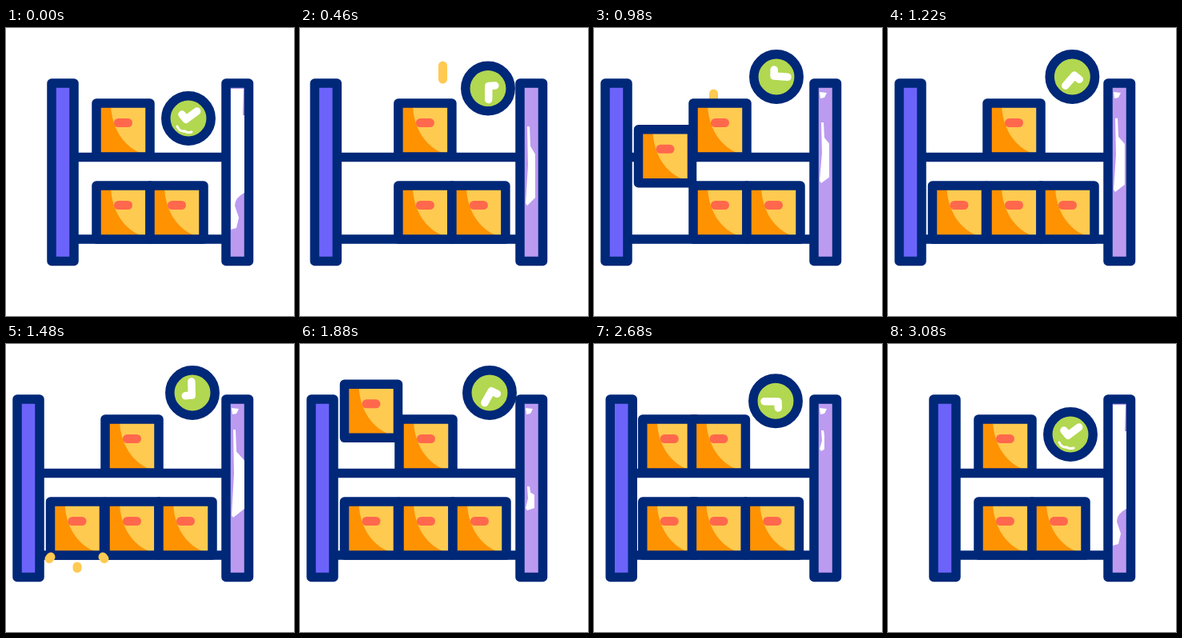
An HTML page for the animation above (3.44 s loop, 360x360 px).

```html
<!DOCTYPE html>
<html lang="en">
<head>
<meta charset="utf-8">
<title>Shelf</title>
<style>
  html, body { margin: 0; width: 100%; height: 100%; overflow: hidden; background: #fff; }
  svg { display: block; width: 100vw; height: 100vh; }
  .line { stroke: #002878; stroke-width: 11.5; stroke-linejoin: round; stroke-linecap: round; }
  .spark { stroke: #ffca52; stroke-width: 11; stroke-linecap: round; fill: none; }
</style>
</head>
<body>
<svg viewBox="0 0 360 360">
  <defs>
    <g id="box">
      <rect width="67" height="67" fill="#ffca50"/>
      <path d="M0 0H18C18 25 30 52 55 62L67 67H0Z" fill="#ff9200"/>
      <rect x="22" y="19" width="23" height="11" rx="5.5" fill="#ff684c"/>
      <rect class="line" width="67" height="67" fill="none"/>
    </g>
  </defs>

  <path id="shelves" class="line" fill="none"/>
  <g id="dashes" class="spark"><path/><path/></g>
  <use id="lowBox" href="#box"/>
  <use id="highBox" href="#box"/>
  <g id="stock">
    <use href="#box" x="113" y="94"/>
    <use href="#box" x="113" y="197"/>
    <use href="#box" x="180" y="197"/>
  </g>
  <rect id="leftPost" class="line" x="57" y="69" width="28" height="222.5" fill="#6c63fb"/>
  <rect class="line" x="275" y="69" width="28.5" height="222.5" fill="#bc9af0"/>
  <path id="restShine" fill="#fff" d="M281 76H297L296 109H298V206Q286 212 286 222L291 237L288 250L281 252Z"/>
  <path id="shine" fill="#fff"/>
  <path id="glint" fill="#fff" d="M282 80L291 81L288 87L283 88Z"/>
  <path id="dust" class="spark"/>
  <g id="badge">
    <circle class="line" r="28.2" fill="#b2d750"/>
    <path id="hands" d="M0-14L-1 3L-9 3" fill="none" stroke="#fff" stroke-width="9.5"
          stroke-linecap="round" stroke-linejoin="round"/>
    <path id="arc" d="M-14 10Q-11 17-4 16M-3 17Q1 18 4 17" fill="none" stroke="#fff"
          stroke-width="3" stroke-linecap="round"/>
  </g>
</svg>
<script>
  const LOOP = 3440;
  const $ = id => document.getElementById(id);
  const clamp = v => Math.min(1, Math.max(0, v));
  const lerp = (a, b, p) => a + (b - a) * p;
  const ease = (t, start, duration) => {
    const p = clamp((t - start) / duration);
    return p * p * (3 - 2 * p);
  };
  const show = (el, on) => el.setAttribute('visibility', on ? 'visible' : 'hidden');
  const place = (el, x, y) => el.setAttribute('transform', `translate(${x} ${y})`);

  // Each key is [time, ...values].
  function track(keys, t) {
    let i = 0;
    while (i < keys.length - 2 && t >= keys[i + 1][0]) i++;
    const [a, b] = [keys[i], keys[i + 1]];
    const p = ease(t, a[0], b[0] - a[0]);
    return a.slice(1).map((v, k) => lerp(v, b[k + 1], p));
  }

  const badgeX = [[220, 228], [460, 235], [980, 228], [1480, 233], [1880, 237], [2680, 227], [2940, 228]];
  const shineKeys = [[240, 90, 245, 15], [460, 123, 222, 12], [980, 118, 194, 12],
    [1480, 107, 217, 16], [1880, 178, 208, 11], [2680, 108, 134, 6], [2940, 90, 180, 10]];
  const dashes = [[178.5, 345], [149.5, 807]];

  function drawSparks(t) {
    dashes.forEach(([x, start], i) => {
      const el = $('dashes').children[i];
      const top = -28 + 0.6 * (t - start);
      el.setAttribute('d', `M${x} ${top + 5.5}v17`);
      show(el, t >= start && top < 94);
    });

    const head = 24 * ease(t, 1440, 140), tail = 16 * ease(t, 1500, 140);
    const ray = (x, y, dx, dy) =>
      `M${x + dx * tail} ${y + dy * tail}L${x + dx * head} ${y + dy * head}`;
    $('dust').setAttribute('d', ray(56, 266, -.4, .5) + ray(89, 278, 0, .5) + ray(121, 266, .4, .5));
    show($('dust'), t >= 1440 && t < 1610);
  }

  function draw(t) {
    const resting = t < 240 || t >= 2940;
    const spread = ease(t, 220, 300) - ease(t, 2609, 300);
    const lift = ease(t, 220, 370) - ease(t, 2576, 370);

    place($('leftPost'), -43 * spread, 0);
    place($('stock'), 11 * spread, 0);
    const left = 85 - 43 * spread;
    $('shelves').setAttribute('d', `M${left} 161.5H275M${left} 264H275`);

    const tuckX = lerp(55.5, 113, ease(t, 2625, 300));
    place($('lowBox'), tuckX, lerp(-75, 197, ease(t, 714, 400)));
    place($('highBox'), tuckX, lerp(-75, 94, ease(t, 1614, 400)));
    show($('lowBox'), t >= 714 && t < 2940);
    show($('highBox'), t >= 1614 && t < 2940);

    place($('badge'), track(badgeX, t)[0], 113 - 52 * lift);
    const turn = 50 + 1440 * clamp((t - 220) / 2730);
    $('hands').setAttribute('transform', `rotate(${turn})`);
    show($('arc'), resting);

    const [top, bottom, width] = track(shineKeys, t);
    const h = bottom - top;
    $('shine').setAttribute('d', `M284 ${top}h3l1 ${h * .25}L${282 + width} ${top + h * .35}V${bottom - h * .1}L284 ${bottom}L282 ${bottom - 3}L285 ${top + h * .5}Z`);
    show($('shine'), !resting);
    show($('restShine'), resting);
    show($('glint'), t >= 700 && !resting);

    drawSparks(t);
  }

  const origin = performance.now();
  function tick() {
    draw((performance.now() - origin) % LOOP);
    requestAnimationFrame(tick);
  }
  tick();
</script>
</body>
</html>
```
